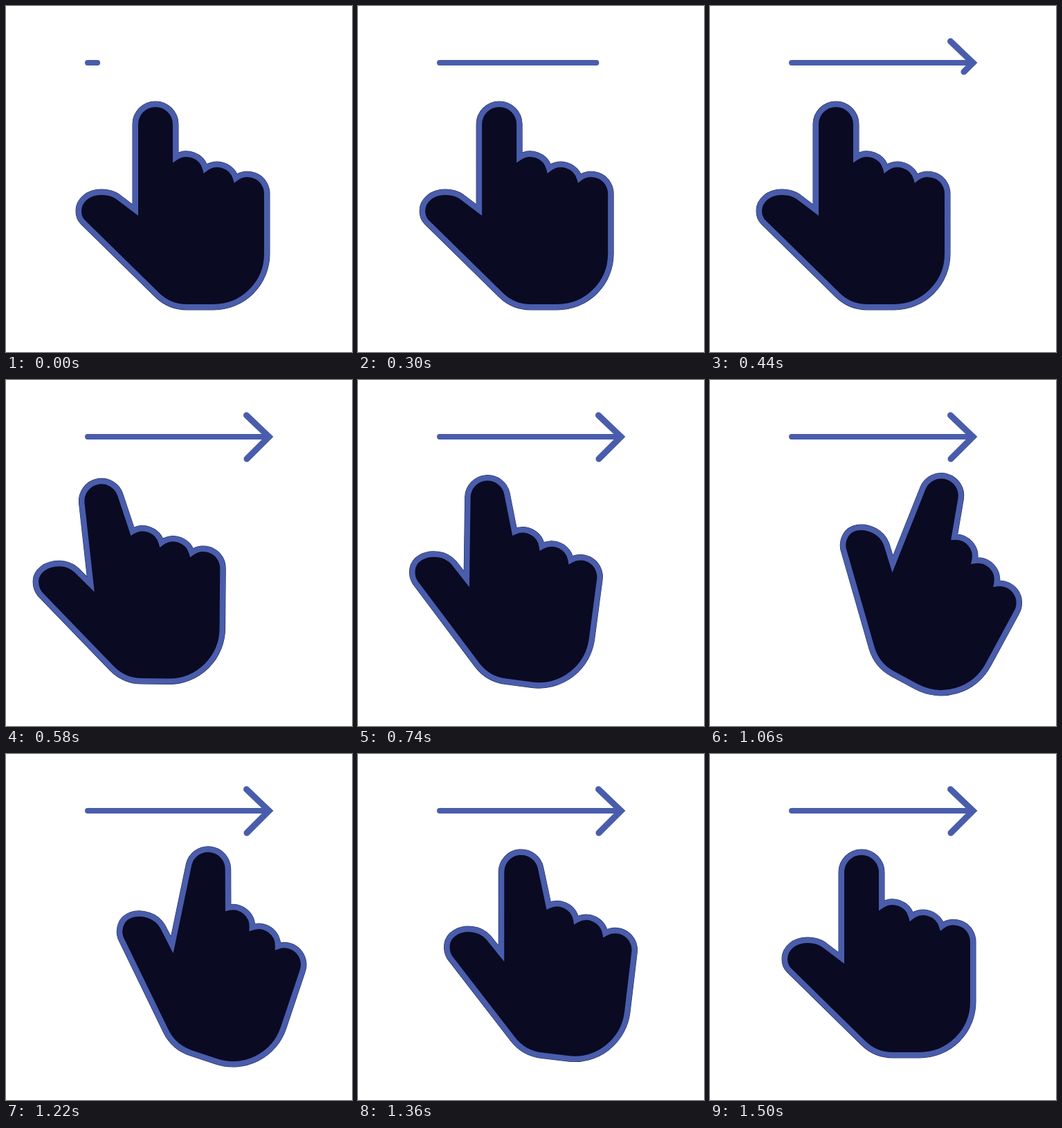
Recreate the animation shown at these times as an HTML page. Size 500x500 px, loop 2.22 s.

```html
<!DOCTYPE html>
<html lang="en">
<head>
<meta charset="utf-8">
<title>Swipe right</title>
<style>
  html, body { margin: 0; width: 100%; height: 100%; overflow: hidden; background: #fff; }
  svg { display: block; width: 100vw; height: 100vh; }
  path { fill: none; stroke: #4a5dac; stroke-width: 8; }
  .arrow { stroke-linecap: round; }
  .head { stroke-width: 9; }
  .hand { fill: #0a0a23; }
  .edge { stroke: #161f4a; stroke-width: 9; }
</style>
</head>
<body>
<svg viewBox="0 0 500 500">
  <path class="arrow" d="M118 82H380"/>
  <path class="arrow head" d="M347.5 51L380 82L348 114"/>
  <g id="hand">
    <path class="hand edge"/>
    <path class="hand"/>
  </g>
</svg>
<script>
const LOOP = 2220, STEP = 20;
const PULLED = 28, SWUNG = 54.7, SETTLED = 74, LAST = 75; // in steps
const LEFT = -69, RIGHT = 78.5, TILT = 31, EASE = 1.3;
const ARROW_SPEED = 14.15;

const palm = `A28 28 0 0 1 291 235A28 28 0 0 1 335 249A28 28 0 0 1 380 272
  V358A77 77 0 0 1 303 435H265A62 62 0 0 1 221 417`;
const straight = `M190 295V171A29 29 0 0 1 248 171V219${palm}
  L114 312C110 308 108 303 108 296C108 281 122 269 141 269C150 269 158 271 165 276Z`;
const bent = `M189.5 296L175.5 178A28.6 28.6 0 0 1 231 166L249 219${palm}
  L116 310C112 305 110 300 110 292C110 278 124 266 144 266C153 266 161 269 168 275Z`;

const hand = document.getElementById('hand');
const outlines = document.querySelectorAll('.hand');
const strokes = [...document.querySelectorAll('.arrow')].map(el => ({ el, length: el.getTotalLength() }));
const mix = (a, b, p) => a + (b - a) * p;

function handPose(k) {
  if (k <= PULLED) return { x: mix(-3, LEFT, (k / PULLED) ** 2.75), angle: 0 };
  if (k <= SWUNG) {
    const p = ((k - PULLED) / (SWUNG - PULLED)) ** EASE;
    return { x: mix(LEFT, RIGHT, p), angle: TILT * p };
  }
  const rest = Math.max(0, (SETTLED - k) / (SETTLED - SWUNG)) ** EASE;
  return { x: RIGHT * rest, angle: TILT * rest };
}

function drawArrow(drawn) {
  for (const { el, length } of strokes) {
    const shown = Math.max(0, Math.min(length, drawn));
    el.style.display = shown ? '' : 'none';
    el.style.strokeDasharray = shown < length ? `${shown} 999` : 'none';
    drawn -= length;
  }
}

function render(now) {
  const k = Math.min(LAST, Math.floor(now % LOOP / STEP));
  const { x, angle } = handPose(k);
  const shape = k > PULLED && k < LAST ? bent : straight;
  outlines.forEach(el => el.setAttribute('d', shape));
  hand.setAttribute('transform', `translate(${x} 0) rotate(${angle} 252 297)`);
  drawArrow(ARROW_SPEED * (k + 1));
  requestAnimationFrame(render);
}
render(performance.now());
</script>
</body>
</html>
```
